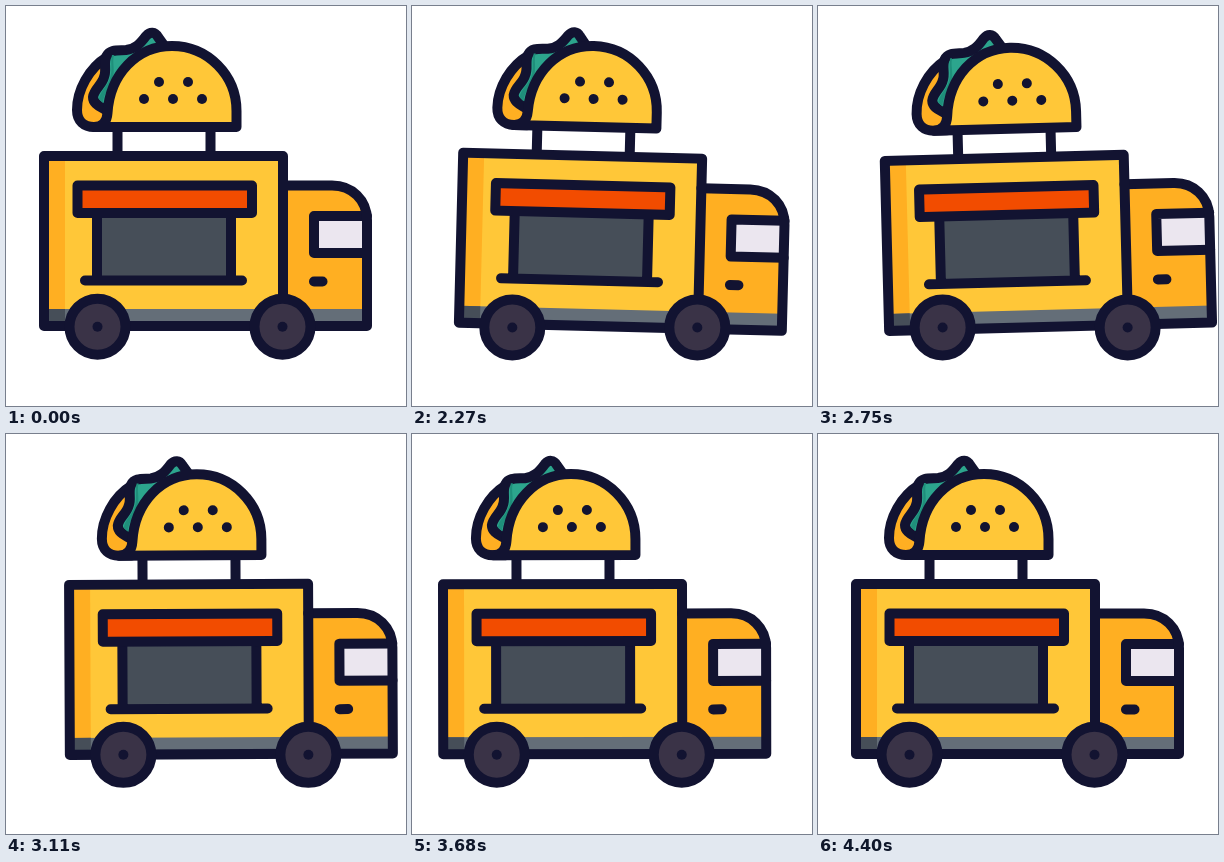
An HTML page that plays this animation: 400x400 px, repeating every 4.43 s.

```html
<!DOCTYPE html>
<html lang="en">
<head>
<meta charset="utf-8">
<title>Taco truck</title>
<style>
  html, body { margin: 0; width: 100%; height: 100%; overflow: hidden; background: #fff; }
  svg { display: block; width: 100vw; height: 100vh; }
  .line { fill: none; stroke: #121331; stroke-width: 10; stroke-linecap: round; stroke-linejoin: round; }
  .ink { fill: #121331; }
  .yellow { fill: #ffc738; }
  .orange { fill: #ffaf22; }
  .red { fill: #f24c00; }
  .green { fill: #2ca58d; }
  .teal { fill: #1f8f7b; }
  .slate { fill: #464e58; }
  .grey { fill: #646e78; }
  .pale { fill: #ebe6ef; }
  .tyre { fill: #3a3347; }
</style>
</head>
<body>
<svg viewBox="0 0 400 400">
  <defs>
    <g id="wheel">
      <circle class="line tyre" r="28"/>
      <circle class="ink" r="5"/>
    </g>
  </defs>

  <g id="truck">
    <!-- sign -->
    <path class="line" d="M111.5 121V150M204.5 121V150"/>
    <path class="line orange" d="M101 51C83 62 71 84 71 104C71 115 78 121 88 121H101"/>
    <path class="line green" d="M157 38L152 31C149 25.500 144 25.500 140 30C134 38 129 43 120 44C112 44.500 104 43 100.500 50C97 57 101 64 98 71C96 79 88 83 87 91C87 99 96 101 101 105"/>
    <path class="teal" d="M106 49C104 56 107 64 104 72C102 80 94 85 93 93L97 97C97 88 105 80 107 72C109 62 106 56 108 49Z"/>
    <path class="line yellow" d="M88 121C97 121 101 115 101.500 107C104 68 131 40 166 40A64.500 65 0 0 1 230.500 105V121Z"/>
    <g class="ink">
      <circle cx="153" cy="76" r="5"/><circle cx="182" cy="76" r="5"/>
      <circle cx="138" cy="93" r="5"/><circle cx="167" cy="93" r="5"/><circle cx="196" cy="93" r="5"/>
    </g>

    <!-- cab and box -->
    <path class="orange" d="M277 179.500H326C346 179.500 361 194 361 214V320H277Z"/>
    <path class="yellow" d="M38 150H277V320H38Z"/>
    <path class="orange" d="M38 150H59V320H38Z"/>
    <path class="grey" d="M38 303H361V320H38Z"/>
    <path class="slate" d="M38 303H59V320H38Z"/>
    <path class="line pale" d="M361 210H308V247H361"/>
    <path class="line" d="M277 179.500H326C346 179.500 361 194 361 214V320H277"/>
    <path class="line" d="M38 150H277V320H38Z"/>
    <path class="line" d="M308 275.500H316.500"/>

    <!-- counter -->
    <path class="slate" d="M91 207H225V274H91Z"/>
    <path class="line" d="M91 207V274M225 207V274M79 274.500H236"/>
    <path class="line red" d="M71.500 179.500H246V207H71.500Z"/>
  </g>

  <g id="wheels">
    <use href="#wheel" x="91.500" y="320.700"/>
    <use href="#wheel" x="276.500" y="320.700"/>
  </g>
</svg>
<script>
  const LOOP = 4430, STEP = 30, START = 2030;
  const truck = document.getElementById('truck');
  const wheels = document.getElementById('wheels');

  // [time in ms, value]
  const shift = [[1990, 0], [2830, 34], [3850, -10], [4400, 0]];
  const tilt = [[1990, 0], [2280, 1.45], [2780, -1.5], [3400, 0.75], [3920, -0.75], [4400, 0]];

  function at(keys, t) {
    if (t <= keys[0][0]) return keys[0][1];
    for (let i = 1; i < keys.length; i++) {
      const [t0, a] = keys[i - 1], [t1, b] = keys[i];
      if (t < t1) {
        const u = (t - t0) / (t1 - t0);
        return a + (b - a) * u * u * (3 - 2 * u);
      }
    }
    return keys[keys.length - 1][1];
  }

  function draw(now) {
    const ms = now % LOOP;
    const t = ms < START ? 0 : START + Math.floor((ms - START) / STEP) * STEP;
    const x = at(shift, t), r = at(tilt, t);
    const move = `translate(${x} ${Math.abs(r) * 0.5})`;
    truck.setAttribute('transform', `${move} rotate(${r} 200 322)`);
    wheels.setAttribute('transform', move);
  }

  const begin = performance.now();
  function tick() {
    draw(performance.now() - begin);
    requestAnimationFrame(tick);
  }
  tick();
</script>
</body>
</html>
```
